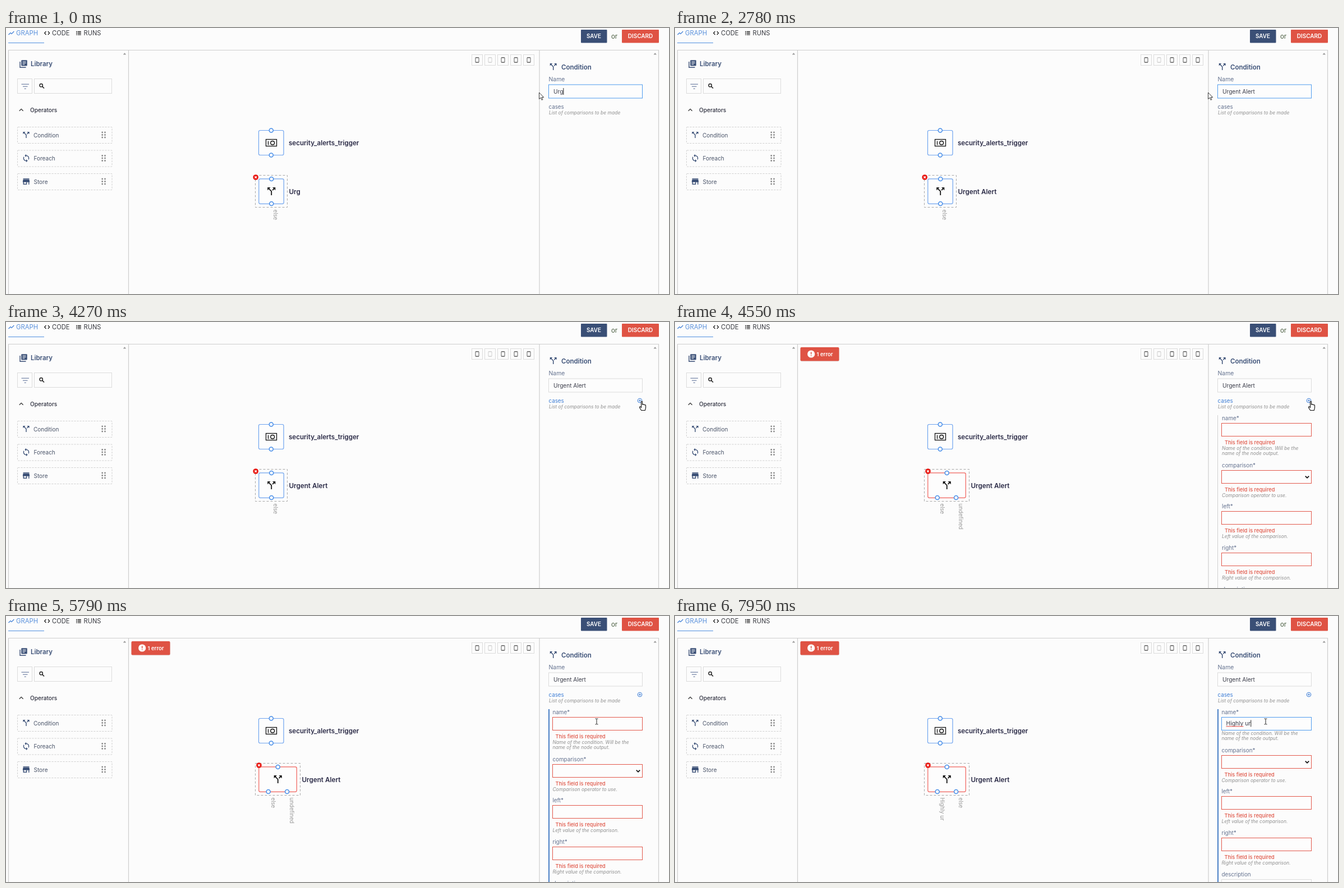
An HTML page that plays this animation: 1182x474 px, repeating every 8 s.

```html
<!DOCTYPE html>
<html lang="en">
<head>
<meta charset="utf-8">
<title>Condition editor</title>
<style>
  html, body { margin: 0; width: 100%; height: 100%; overflow: hidden; background: #fcfcfc; }
  svg { display: block; width: 100%; height: 100%; }
  text { font-family: Inter, "Open Sans", sans-serif; white-space: pre; }
</style>
</head>
<body>
<svg viewBox="0 0 1182 474"><g id="fixed"></g><g id="live"></g></svg>
<script>
const LOOP = 8000;
const NAVY = '#3a4f76', BLUE = '#3f7fd6', EDGE = '#6fa4ee', FOCUS = '#4f9bee', RED = '#df5344',
  INK = '#2a2a46', SLATE = '#64728f', GREY = '#8f8f8f', LINE = '#dcdcdc', PAGE = '#fcfcfc';

const ICONS = {
  split: 'M14 4l2.29 2.29-2.88 2.88 1.42 1.42 2.88-2.88L20 10V4zm-4 0H4v6l2.29-2.29 4.71 4.7V20h2v-8.41l-5.29-5.3z',
  loop: 'M12 4V1L8 5l4 4V6c3.31 0 6 2.69 6 6 0 1.01-.25 1.97-.7 2.8l1.46 1.46C19.54 15.03 20 13.57 20 12c0-4.42-3.58-8-8-8zm0 14c-3.31 0-6-2.69-6-6 0-1.01.25-1.97.7-2.8L5.24 7.74C4.46 8.97 4 10.43 4 12c0 4.42 3.58 8 8 8v3l4-4-4-4v3z',
  store: 'M20 4H4v2h16V4zm1 10v-2l-1-5H4l-1 5v2h1v6h10v-6h4v6h2v-6h1zm-9 4H6v-4h6v4z'
};

// Drawing helpers, all returning SVG markup
const text = (x, y, s, size, fill, extra = '') =>
  `<text x="${x}" y="${y}" font-size="${size}" fill="${fill}" ${extra}>${s}</text>`;
const bold = (x, y, s, size, fill) => text(x, y, s, size, fill, 'font-weight="600"');
const hint = (x, y, s) => text(x, y, s, 8.5, GREY, 'font-style="italic"');
const rect = (x, y, w, h, stroke, fill = 'none', extra = '') =>
  `<rect x="${x}" y="${y}" width="${w}" height="${h}" stroke="${stroke}" fill="${fill}" ${extra}/>`;
const path = (d, stroke, width = 1, fill = 'none') =>
  `<path d="${d}" stroke="${stroke}" stroke-width="${width}" fill="${fill}"/>`;
const dot = (x, y, r, fill, stroke = 'none', width = 1.5) =>
  `<circle cx="${x}" cy="${y}" r="${r}" fill="${fill}" stroke="${stroke}" stroke-width="${width}"/>`;
const port = (x, y) => dot(x, y, 3.5, '#fff', '#4a8fe8', 1.6);
const icon = (name, x, y, scale, fill) =>
  `<path transform="translate(${x} ${y}) scale(${scale}) translate(-12 -12)" d="${ICONS[name]}" fill="${fill}"/>`;
const downward = (x, y, s) => text(0, 0, s, 9.7, '#999', `transform="translate(${x} ${y}) rotate(90)"`);

function operator(y, name, iconName, x, scale) {
  let out = rect(20.5, y - 14, 168.5, 29, '#cfcfcf', 'none', 'stroke-dasharray="3 2" rx="1"')
    + icon(iconName, 36, y, scale, NAVY) + text(x, y + 4, name, 10, '#4a5469');
  for (const dx of [171.7, 176.5]) for (const dy of [-4.5, 0, 4.5]) out += dot(x = 0 || dx, y + dy, 1.4, '#8a8a8a');
  return out;
}

function toolButton(x, color) {
  return rect(x, 47.5, 19, 19, LINE)
    + rect(x + 6.5, 52.5, 6, 9, color, 'none', 'rx="1"')
    + path(`M${x + 6.5} 53h6M${x + 6.5} 61h6`, color, 1.2);
}

function fixedScene() {
  return path('M4.5 12 8 8.5 10 10.5 14.3 6', BLUE, 1.2) + text(18, 13, 'GRAPH', 11.3, '#5a91dc')
    + path('M71.5 6 68.7 9l2.8 3M74.8 6 77.6 9l-2.8 3', '#222', 1.3) + text(82, 13, 'CODE', 11.2, '#383a40')
    + path('M125 6.5h1.8M125 9.2h1.8M125 11.9h1.8M127.8 6.5h6M127.8 9.2h6M127.8 11.9h6', '#222', 1.4)
    + text(138.5, 13, 'RUNS', 11.1, '#383a40')
    + path('M4 26.5H68', '#4f8fe0')
    + rect(1025, 3, 46.5, 23.5, 'none', NAVY, 'rx="1"') + bold(1035, 18.3, 'SAVE', 9.9, '#fff')
    + text(1079, 18.7, 'or', 11.3, '#465a3c')
    + rect(1098, 3, 66, 23.5, 'none', RED, 'rx="1"') + bold(1108.7, 18.3, 'DISCARD', 10, '#fff')
    + path('M4.5 474V39.5H1163.5V474M218.5 39.5V474M951 39.5V474', '#cdcdcd', 1.2)
    + path('M208.8 47.5h5.4l-2.7-3.2zM1154.5 47.5h5.4l-2.7-3.2z', 'none', 0, '#999')
    // Library panel
    + path('M25 60V70.3H35.5', NAVY, 1.4) + rect(27.3, 57.3, 10.4, 10.2, 'none', NAVY, 'rx="1"')
    + path('M29.5 60h6M29.5 62.4h6M29.5 64.8h4', '#fff', 1)
    + bold(44, 68, 'Library', 11.4, NAVY)
    + rect(20.5, 90.5, 26, 26, LINE) + path('M27.5 100.3h13.5M30 104.3h8.5M32.7 108.3h3', '#8c99b6', 1.4)
    + rect(50.5, 90.5, 138, 26, LINE) + dot(62.7, 102.2, 2.7, 'none', '#222', 1.4)
    + path('M64.8 104.3 68 107.5', '#222', 1.6)
    + path('M23.8 147.8 27.2 144.4 30.6 147.8', '#333', 1.3)
    + text(43, 150, 'Operators', 10.1, '#2b2d3c', 'font-weight="500"')
    + operator(190.5, 'Condition', 'split', 49, .7)
    + operator(232, 'Foreach', 'loop', 49.5, .66)
    + operator(273.5, 'Store', 'store', 49.5, .68)
    // Canvas
    + [830.5, 853.5, 876.5, 899.5, 922.5].map((x, i) => toolButton(x, i === 1 ? '#d0d0d0' : '#606060')).join('')
    + rect(450.5, 182.5, 44.5, 44, EDGE, '#fdfdfd', 'rx="2.5" stroke-width="1.2"')
    + port(472.8, 182.5) + port(472.8, 226.5)
    + rect(463.5, 198.5, 19, 12, '#111', 'none', 'stroke-width="1.3"')
    + path('M467.5 201.5v7', '#111', 1.3) + rect(471.8, 201.5, 6.8, 6.5, '#111', 'none', 'rx="3" stroke-width="1.3"')
    + bold(504, 209, 'security_alerts_trigger', 11.6, INK)
    // Condition panel
    + icon('split', 975.7, 69, .74, NAVY) + bold(990, 73.5, 'Condition', 11.5, NAVY)
    + text(967.5, 95, 'Name', 10.4, SLATE);
}

// Timeline
const NAME = 'Urgent Alert', CASE = 'Highly ur';
const NAME_KEYS = [150, 330, 500, 680, 1230, 1510, 1820, 2070, 2350];
const CASE_KEYS = [5940, 6340, 6770, 6950, 7140, 7410, 7590, 7770, 7950];
const CARET_OFF = 2780, BLUR = 3330, HOVER_CASES = 3830, ADD_CASE = 4550;
const POINTER = [
  [0, 950.5, 115, 'arrow'], [3090, 985, 128, 'arrow'], [3220, 1035, 155, 'arrow'], [3330, 1055, 166, 'arrow'],
  [3570, 1060, 165, 'arrow'], [3700, 1080, 160, 'arrow'], [3830, 1103, 150, 'arrow'], [3970, 1120, 143, 'arrow'],
  [4120, 1131, 140, 'arrow'], [4270, 1133.5, 141, 'hand'], [4680, 1120, 154, 'arrow'], [4820, 1095, 169, 'arrow'],
  [4960, 1072, 181, 'beam'], [5100, 1058, 187, 'beam'], [5230, 1053, 188, 'beam']
];
const CURSORS = {
  arrow: path('M0 0V11.6L2.7 9.1 4.6 13.3 6.4 12.5 4.6 8.5H8.2z', '#222', .9, '#fff'),
  hand: path('M-1 1Q0-.6 1 1V6Q2 5 3 6.2 4.2 5.4 5 6.8 6.6 6.2 7 8V12L5.8 16.5H-.8L-4 11.5Q-4.3 9.5-2.6 10L-1 11.3z', '#111', 1.1, '#fff'),
  beam: path('M-2.5-5H-.6L0-4.4.6-5H2.5M0-4.4V4.4M-2.5 5H-.6L0 4.4.6 5H2.5', '#222', 1)
};

const pressed = (keys, t) => keys.filter(k => t >= k).length;

function node(name, caseName, added) {
  const width = added ? 67.5 : 44.5, mid = 451 + width / 2;
  let out = rect(444.5, 262.5, width + 12.5, 57, '#a8a8a8', 'none', 'stroke-dasharray="4 3"')
    + rect(450.8, 268.8, width, 44.5, added ? '#f0605a' : EDGE, '#fdfdfd', 'rx="2.5" stroke-width="1.2"')
    + icon('split', mid, 291, .88, '#111') + port(mid, 269)
    + bold(460 + width, 296, name, 11.7, INK);
  const labels = !added ? ['else'] : caseName ? [caseName, 'else'] : ['else', 'undefined'];
  labels.forEach((s, i) => {
    const x = added ? 467.7 + i * 33.4 : mid;
    out += port(x, 313) + downward(x + (added ? 4.8 : 4), 323.5, s);
  });
  const x = added ? 451 : 445.2;
  return out + dot(x, 266, 4.8, '#e8150f') + path(`M${x - 1.8} 264.2l3.6 3.6m0-3.6l-3.6 3.6`, '#fff', 1.3);
}

// A labelled input whose box starts at the given top
function field(x, top, label, help, invalid, focused) {
  const helpY = top + (invalid ? 47 : 31);
  return text(x, top - 6, label, 9.9, SLATE)
    + rect(974.5, top, 160, 23, focused ? FOCUS : invalid ? '#e2594c' : LINE, '#fdfdfd')
    + (invalid ? text(x + 5, top + 37.3, 'This field is required', 9.2, RED, 'font-weight="500"') : '')
    + help.map((s, i) => hint(x, helpY + i * 9.5, s)).join('');
}

function caseForm(typed, hovered) {
  const x = hovered ? 974.4 : 975, shift = typed ? 16 : 0;
  return (hovered ? path('M968 166V474', '#4a7fc6', 2) : path('M967.5 166V474', '#d0d0d0'))
    + field(x, 180.5, 'name*', ['Name of the condition. Will be the', 'name of the node output.'], !typed, !!typed)
    + field(x, 264.5 - shift, 'comparison*', ['Comparison operator to use.'], true)
    + path(`M1123.8 ${274.6 - shift}l3.2 3.2 3.2-3.2`, '#111', 1.8)
    + field(x, 337.5 - shift, 'left*', ['Left value of the comparison.'], true)
    + field(x, 411.5 - shift, 'right*', ['Right value of the comparison.'], true)
    + field(x, 485.5 - shift, 'description', [], false)
    + (typed ? text(982.5, 195, typed, 10.3, '#3a3c49', 'id="typing"') : '');
}

function liveScene(t) {
  const name = NAME.slice(0, 3 + pressed(NAME_KEYS, t));
  const typed = CASE.slice(0, pressed(CASE_KEYS, t));
  const added = t >= ADD_CASE, over = t >= HOVER_CASES, editing = t < BLUR;
  const [, px, py, kind] = POINTER.filter(p => t >= p[0]).pop();
  let out = node(name, typed, added)
    + rect(967.5, 101, 167, 24, editing ? FOCUS : LINE, '#fdfdfd')
    + text(976, 116.6, name, 10.1, '#3a3c49', t < CARET_OFF ? 'id="typing"' : '')
    + text(967.5, 144, 'cases', 9.8, over ? BLUE : SLATE)
    + hint(968, 153.5, 'List of comparisons to be made');
  if (over) out += dot(1130, 140, 3.7, PAGE, BLUE, 1.1) + path('M1128 140h4M1130 138v4', BLUE);
  if (added) {
    out += rect(223.5, 46, 69.5, 24.3, 'none', '#e4e4e4', 'rx="2"')
      + rect(223.5, 45, 69, 24.5, 'none', RED, 'rx="2"') + dot(242.7, 57, 6.6, '#fff')
      + path('M242.7 53.2v4.6M242.7 59.2v1.6', RED, 1.5) + bold(252.5, 60.6, '1 error', 9.5, '#fff')
      + caseForm(typed, py > 165);
  }
  return out + `<g id="caret"></g><g transform="translate(${px} ${py})">${CURSORS[kind]}</g>`;
}

// The caret and spelling mark follow the measured text
function drawCaret() {
  const input = document.getElementById('typing');
  if (!input) return;
  const x = +input.getAttribute('x'), y = +input.getAttribute('y');
  const end = x + input.getComputedTextLength() + .5;
  let marks = path(`M${end} ${y - 9.6}v12`, '#222');
  if (input.textContent.startsWith('Highly '))
    marks += path(`M${x} ${y + 1.8}h${input.getSubStringLength(0, 6)}`, '#e8413a');
  document.getElementById('caret').innerHTML = marks;
}

const live = document.getElementById('live');
let shown = '';
function frame() {
  const scene = liveScene(performance.now() % LOOP);
  if (scene !== shown) {
    live.innerHTML = shown = scene;
    drawCaret();
  }
  requestAnimationFrame(frame);
}
document.getElementById('fixed').innerHTML = fixedScene();
frame();
</script>
</body>
</html>
```
